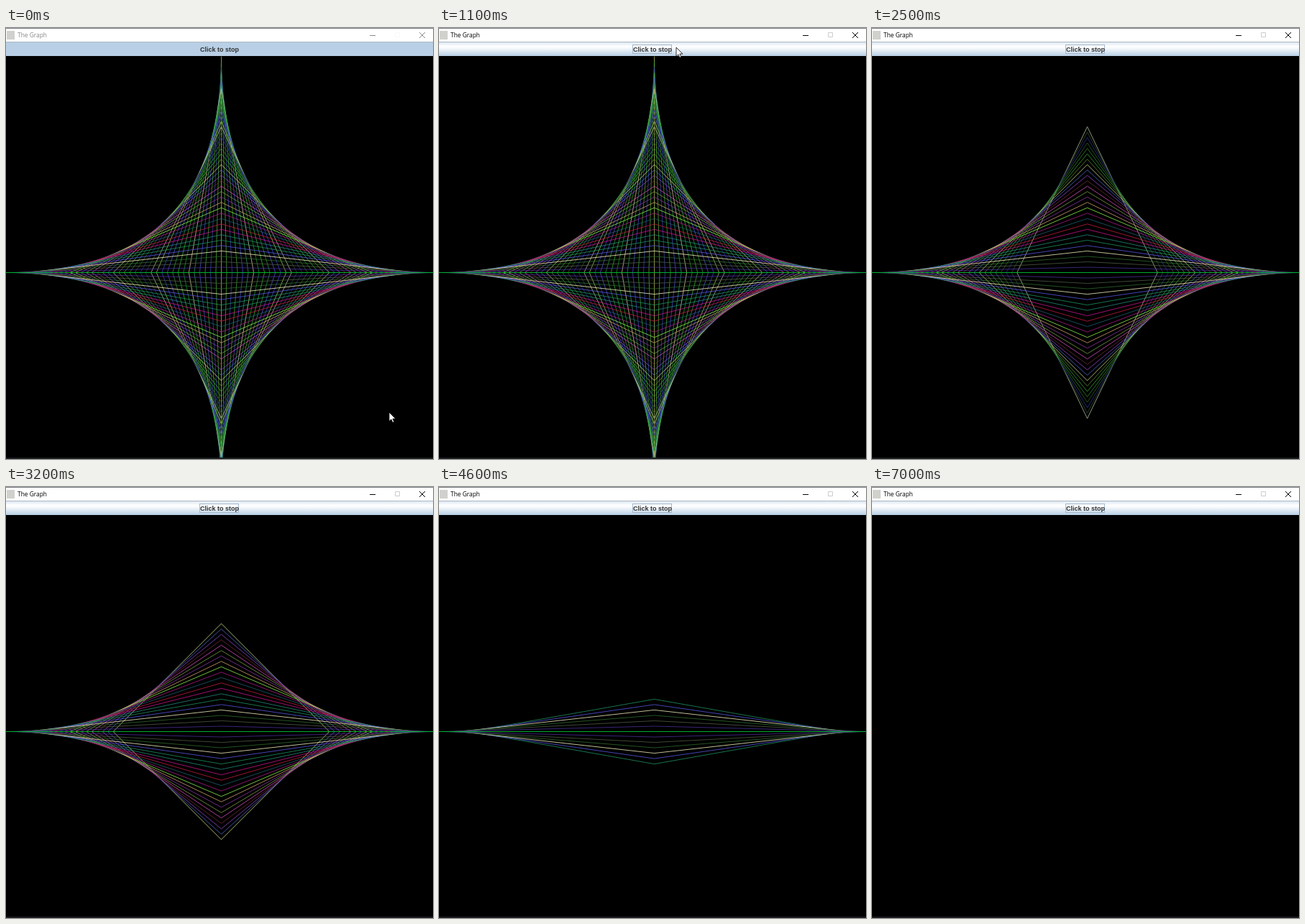
An HTML page that plays this animation: 594x600 px, repeating every 7100 ms.

```html
<!DOCTYPE html>
<html lang="en">
<head>
<meta charset="utf-8">
<title>The Graph</title>
<style>
  html, body { margin: 0; width: 100%; height: 100%; overflow: hidden; background: #000; }
  svg { display: block; }
  .title { font: 8.4px "Open Sans", "Noto Sans", sans-serif; }
  .label { font: bold 9px "Liberation Sans", Arial, sans-serif; fill: #333; }
  #rhombi { fill: none; stroke-width: .8; stroke-linejoin: bevel; }
</style>
</head>
<body>
<svg width="594" height="600" viewBox="0 0 594 600">
  <defs>
    <linearGradient id="steel" x2="0" y2="1">
      <stop stop-color="#dde8f3"/>
      <stop offset=".3" stop-color="#fff"/>
      <stop offset=".45" stop-color="#f4f8fb"/>
      <stop offset="1" stop-color="#b8cfe5"/>
    </linearGradient>
  </defs>
  <rect width="594" height="600"/>
  <g id="rhombi"></g>
  <rect y="598" width="594" height="2" fill="#1c1d20"/>

  <rect width="594" height="20" fill="#fff"/>
  <rect id="minHover" x="493" y="1" width="34" height="18" fill="#ebedef"/>
  <rect width="594" height="1" fill="#777b82"/>
  <rect x="1" y="4" width="11" height="12" fill="#d0d1cc"/>
  <g id="chrome">
    <text class="title" x="16" y="13" fill="currentColor">The Graph</text>
    <path d="M506 10.5h8M575 6l8 8m0-8l-8 8" stroke="currentColor" fill="none"/>
  </g>
  <path id="maximize" d="M541.5 6.5h6v6h-6z" stroke="#ccc" fill="none"/>
  <rect id="closeHover" x="562" y="1" width="32" height="18" fill="#953070"/>

  <rect id="button" y="20" width="594" height="19"/>
  <path d="M0 19.5h594" stroke="#7a8a99" stroke-opacity=".6"/>
  <rect id="focus" x="269.5" y="23.5" width="54" height="12" fill="none" stroke="#a3b8cc"/>
  <text class="label" x="297" y="33" text-anchor="middle">Click to stop</text>

  <path id="cursor" d="M0 0v12.5l2.9-2.7 2 4.4 2-.9-2-4.3h4z" fill="#fff" stroke="#000" stroke-width=".8"/>
</svg>
<script>
const LOOP = 7100, TICK = 100, STEP = 7.52, COUNT = 40;
const CX = 299.5, CY = 340.5;
const COLORS = (
  '00b432 4a2f96 4d5a45 2c6a2c f0eebc 5656e0 1f9160 238a78 c8148c c01c40 ' +
  '1f5c70 a81c88 8cf04c d0a070 8a38a0 7a9c48 d44cb8 6c2c34 9048c8 4c68c0 ' +
  'd0e090 648c30 38a838 2c8c34 386028 28348c 2c4c3c b4bc98 98c860 3c48c8 ' +
  '4c58d0 2c9440 34b434 18982c c8c898 2c9468 4450c0 3ca03c 38489c 50a838 8c9848'
).split(' ');

const $ = id => document.getElementById(id);
const show = (id, on) => $(id).setAttribute('visibility', on ? 'visible' : 'hidden');

// Flatter rhombi lie on top, so the horizontal axis stays visible
const rhombi = COLORS.map((color, i) => {
  const path = document.createElementNS('http://www.w3.org/2000/svg', 'path');
  const h = STEP * i, w = STEP * (COUNT - i);
  path.setAttribute('d', `M${CX - w} ${CY}L${CX} ${CY - h} ${CX + w} ${CY} ${CX} ${CY + h}Z`);
  path.setAttribute('stroke', '#' + color);
  $('rhombi').prepend(path);
  return path;
});

// Pointer stops: time, x, y
const STOPS = [[0, 533, 535], [200, 533, 535], [900, 330, 27], [1200, 330, 27], [1700, 510, 8], [1900, 594, 4]];

function pointerAt(t) {
  const n = STOPS.findIndex(stop => stop[0] > t);
  if (n < 0) return null;
  const [t0, x0, y0] = STOPS[n - 1], [t1, x1, y1] = STOPS[n];
  const p = (t - t0) / (t1 - t0), e = p * p * (3 - 2 * p);
  return [x0 + (x1 - x0) * e, y0 + (y1 - y0) * e];
}

function draw(now) {
  const t = Math.floor(now % LOOP / TICK) * TICK;
  const last = 52 - t / TICK;
  rhombi.forEach((path, i) => path.style.display = i <= last ? '' : 'none');

  const active = t >= 200;
  $('chrome').style.color = active ? '#000' : '#888';
  $('maximize').setAttribute('stroke', active ? '#ccc' : '#f8f8f8');
  $('button').setAttribute('fill', t < 1000 ? '#b8cfe5' : 'url(#steel)');
  show('focus', active);
  show('minHover', t >= 1700 && t < 2000);
  show('closeHover', t >= 1800 && t < 2000);

  const pointer = pointerAt(t);
  show('cursor', pointer);
  if (pointer) $('cursor').setAttribute('transform', `translate(${pointer})`);
  requestAnimationFrame(() => draw(performance.now()));
}
draw(performance.now());
</script>
</body>
</html>
```
